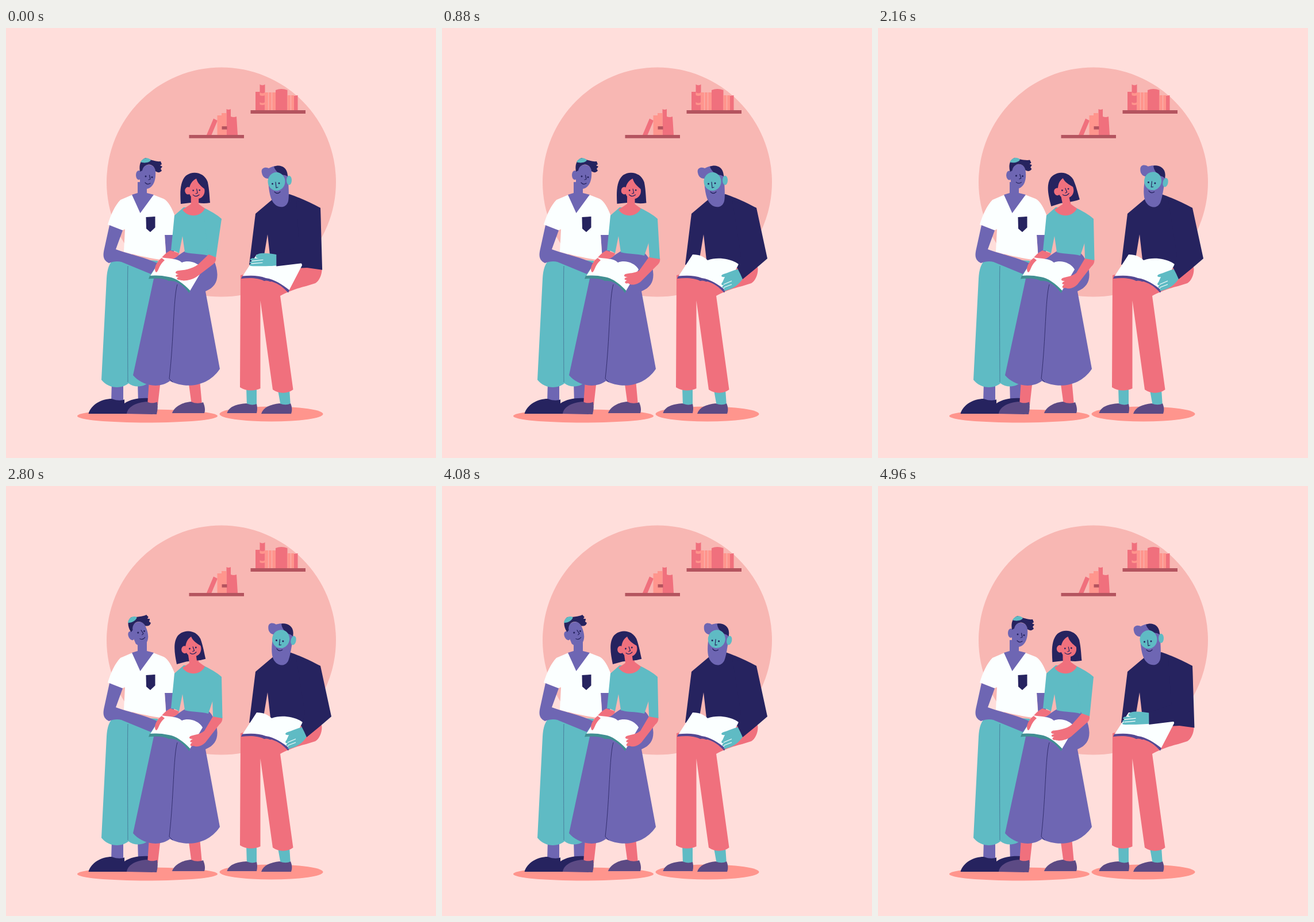
An HTML page that plays this animation: 748 by 748 pixels, repeating every 5 s.

```html
<!DOCTYPE html>
<html lang="en">
<head>
<meta charset="utf-8">
<title>Reading together</title>
<style>
html, body { margin: 0; width: 100%; height: 100%; overflow: hidden; background: #ffdedb; }
svg { display: block; width: 100vw; height: 100vh; }
.purple { fill: #6e66b3; }
.navy { fill: #26235f; }
.teal { fill: #5fbbc4; }
.pink { fill: #f0707d; }
.coral { fill: #ff958d; }
.white { fill: #fbffff; }
.shoe { fill: #5c4a84; }
.wood { fill: #b4545f; }
.line { fill: none; stroke: #26235f; stroke-width: 1.2; stroke-linecap: round; stroke-linejoin: round; }
.seam { fill: none; stroke: #26235f; stroke-width: .8; }
</style>
</head>
<body>
<svg viewBox="0 0 748 748">
  <rect width="748" height="748" fill="#ffdedb"/>
  <circle cx="374.5" cy="268" r="199.5" fill="#f8b7b3"/>
  <ellipse class="coral" cx="246" cy="675" rx="122" ry="11.5"/>
  <ellipse class="coral" cx="461.5" cy="671.5" rx="90" ry="13"/>

  <g id="shelves">
    <path class="pink" d="M349 186L361 157.5L368 161L357.500 186ZM383.500 141Q387 143 391 141V154Q396 156 401 154L403 186H383.500Z"/>
    <path class="coral" d="M367.500 152H375V148H383.500V186H367.500Z"/>
    <rect class="wood" x="375.500" y="171" width="9" height="5.500"/>
    <rect class="wood" x="318.500" y="186" width="95.500" height="5.700"/>
    <path class="pink" d="M434 111H441.500V98Q446 101 450.500 98V143H434ZM469 108Q479 104 489.500 108V143Q479 147 469 143ZM501 118L507.500 117V143H501Z"/>
    <path class="coral" d="M450.500 112H469V143H450.500ZM489.500 117H501V143H489.500ZM441.500 112Q446 115 450.500 112V117Q446 119 441.500 117ZM441.500 129Q446 132 450.500 129V133Q446 135 441.500 133Z"/>
    <path d="M456.500 112V143M462.500 112V143M495.500 117V143" stroke="#f8b7b3" stroke-width="1"/>
    <rect class="wood" x="425.500" y="143" width="95.500" height="6"/>
  </g>

  <g id="guy">
    <path class="purple" d="M184 615H204V652H183ZM229 615H249V652H230Z"/>
    <path class="navy" d="M143.500 671C148 655 166 645 184 645C194 649 203 648 206 646V653C216 646 232 643 248 644V671Z"/>
    <path class="teal" d="M190 400C179 408 176 420 175 436L166 612C178 627 200 629 213 618C225 627 243 625 252 612L264 405Z"/>
    <path class="seam" d="M212 414Q211 440 212 616" opacity=".5"/>
    <path class="purple" d="M276 358H292V402H279Z"/>
    <path class="white" d="M220 290H256L274 297C282 301 288 312 293 325L292 360H276L279 404C255 402 225 395 205 389L207 350L202 352L177 342C182 325 190 308 199 299Z"/>
    <path class="purple" d="M180 343L171 384C168 397 169 404 179 409C186 406 194 405 201 407L252 428L265 410C240 398 212 393 191 385L203 352Z"/>
    <path class="purple" d="M219 290L229 287V268H245V287L257 290L233.500 322Z"/>
    <path class="navy" d="M243.500 329L259.500 328V347L251 355L244 349Z"/>
    <g id="guyHead">
      <ellipse class="purple" cx="231" cy="256" rx="5" ry="8"/>
      <path class="purple" d="M233 249C236 236 258 233 260 248C261 262 258 273 250 278C245 281 238 281 233 272Z"/>
      <path class="navy" d="M233 250C231 238 234 229 243 226C251 229 262 233 269 232L271 237L268 239L272 241L269 245L271 248C268 252 264 252 260 249C258 234 240 234 237 248Z"/>
      <path class="teal" d="M234 233C238 225 248 224 252 230C250 234 240 236 234 233Z"/>
      <g id="guyFace">
        <circle class="navy" cx="243" cy="258" r="1.500"/>
        <circle class="navy" cx="254" cy="259.500" r="1.500"/>
        <path class="line" d="M249.500 256L251 263L248 264M242 269Q246 273.500 251 270"/>
      </g>
    </g>
  </g>

  <g id="girl">
    <path class="pink" d="M249 612L246 656H264L269 612ZM317 612L323 656H341L337 612Z"/>
    <path class="shoe" d="M210 671C212 658 228 651 245 650C250 653 258 653 263 650.500Q265 661 262 672ZM289 670C293 658 308 651 322 650C330 654 338 653 343 651C346 658 347 665 345 670Z"/>
    <path class="purple" d="M313 387C295 398 275 412 257 436L221 604C235 621 265 629 285 614C310 627 350 626 372 593L347 458C362 452 368 442 367.500 428C367 412 359 397 352 391Z"/>
    <path class="seam" d="M298 446C291 470 292 540 284 610L290 616"/>
    <path class="teal" d="M309 312L341 311C355 318 368 325 375 332L360 372L352 396C338 392 325 394 311 390L307 362L301 392C296 388 291 387 287 387L293 326Z"/>
    <path class="pink" d="M307 316L322 306V290H335V306L346 314C338 330 316 330 307 316Z"/>
    <path class="pink" d="M286 387L301 392C300 400 288 402 278 406L265 425C258 422 258 415 264 408C270 400 276 392 286 387Z"/>
    <path class="white" d="M271 399C285 402 298 400 306 408C318 403 335 408 342 420L319 459C308 445 296 436 283 434C270 431 260 431 250 433Z"/>
    <path fill="#418f92" d="M250 431L248 436.500C262 435 275 435 283 440C296 438 308 447 318.500 461L320.500 457C308 444 296 435 283 433C270 430 260 430 250 431Z"/>
    <path class="pink" d="M271 400C262 406 256 419 261 425C266 424 265 413 276 404Z"/>
    <path class="pink" id="girlArm"/>
    <path class="teal" id="girlSleeve"/>
    <g id="girlHead">
      <path class="navy" d="M304 306C303 288 302 268 313 257C325 247 345 251 351 268C354 282 354 295 355 304Q344 306 334 304H321Z"/>
      <g id="girlFace">
        <path class="pink" d="M321.500 288H335V310H321.500Z"/>
        <ellipse class="pink" cx="316.500" cy="283" rx="5.500" ry="6.500"/>
        <path class="pink" d="M318 283C319 272 324 265 331 262C333 270 339 275 345 280C347 290 340 298 331 297C323 297 318 291 318 283Z"/>
        <circle class="navy" cx="325.500" cy="282.500" r="1.400"/>
        <circle class="navy" cx="336.500" cy="282" r="1.400"/>
        <path class="line" d="M331.500 280L333 287L330 288M325 290Q330 295 336 290"/>
      </g>
    </g>
  </g>

  <g id="man">
    <path class="teal" d="M418 625H436V658H419ZM473 630L493 628L495 658H478Z"/>
    <path class="shoe" d="M384.500 670C388 658 402 654 418 653C425 656 431 656 436 654Q438 662 436 670ZM444 671C448 659 460 655 476 653C483 656 490 656 495 653C498 660 498 666 496 671Z"/>
    <path class="pink" d="M408 430L407 625C418 632 432 632 442.500 627L442.500 474L464 629C475 637 490 636 499.500 629L477 466C487 460 505 453 522 449L538 444C546 440 551 425 549 416L500 410Z"/>
    <path class="navy" d="M466 296L434 323L423 412L447 407L455 359L461 412L500 418L548 416L547 313C530 304 511 295 493 289Z"/>
    <path class="white" d="M436 394C448 394 456 398 462 404C480 397 505 402 516 411L491 459C478 447 465 439 452 437C440 432 425 431 410 434Z"/>
    <path fill="#544892" d="M411 431.500L409 436C425 434 440 435 449 440C455 438 458 442 462 441C475 445 483 452 491 460.500L493 456C480 446 467 437 452 435C440 430 425 430 411 431.500Z"/>
    <path class="teal" id="manHand"/>
    <path id="manFingers" fill="none" stroke="#fbffff" stroke-width="1.200"/>
    <path class="navy" id="manSleeve"/>
    <g id="manHead">
      <path class="purple" d="M445 252C443 244 450 241 457 244C463 240 472 239 478 240L491 258C491 275 493 290 491 301C488 313 476 314 468 307C460 300 457 285 456 262C450 262 446 258 445 252Z"/>
      <path class="navy" d="M466 241C475 237 490 240 490 258L485 256C479 256 469 251 466 241Z"/>
      <ellipse class="teal" cx="492.500" cy="265" rx="4.500" ry="8"/>
      <ellipse class="teal" cx="470.500" cy="267" rx="15" ry="16"/>
      <circle class="navy" cx="463.500" cy="271" r="1.500"/>
      <circle class="navy" cx="475" cy="270" r="1.500"/>
      <path class="line" d="M469 268L470 278L473 277M467 285Q472 290 477 285"/>
    </g>
  </g>
</svg>
<script>
const LOOP = 5000;
const $ = id => document.getElementById(id);
const NUM = /-?\d+(?:\.\d+)?/g;

// Blends same-structure paths; the last one takes the remaining weight.
function morph(id, ...paths) {
  const sets = paths.map(p => p.match(NUM).map(Number));
  const last = sets.pop();
  return weights => {
    let i = 0;
    const d = paths[0].replace(NUM, () => {
      const v = sets.reduce((sum, s, k) => sum + weights[k] * (s[i] - last[i]), last[i]);
      i++;
      return v.toFixed(2);
    });
    $(id).setAttribute('d', d);
  };
}

// Keys are [time, ...values], joined by sine easing.
function track(t, keys) {
  const n = keys.findIndex(k => k[0] > t);
  const [t0, ...a] = keys[n - 1], [t1, ...b] = keys[n];
  const e = (1 - Math.cos(Math.PI * (t - t0) / (t1 - t0))) / 2;
  return a.map((v, i) => v + (b[i] - v) * e);
}

const turn = (id, x, y, deg, dx = 0, dy = 0) =>
  $(id).setAttribute('transform', `translate(${dx} ${dy}) rotate(${deg} ${x} ${y})`);
const shift = (id, dx, dy = 0) => $(id).setAttribute('transform', `translate(${dx} ${dy})`);

const girlSleeve = morph('girlSleeve',
  'M345 330L375 332L365 399L351 393L349 370Z',
  'M350 330L375 332L379 402L361 399L359 370Z',
  'M350 330L375 332L376.5 404L360 401L359 370Z');
const girlArm = morph('girlArm',
  'M352 394L334 411C322 420 308 421 298 422C292 424 294 428 300 428C293 429 293 433 300 433C295 434 296 438 302 438C308 441 324 438 332 432L360 411C365 407 366 402 364 397Z',
  'M361 397L343 422C335 427 325 426 319 428C315 431 317 433 323 433C316 435 316 438 322 439C316 441 318 446 324 444C330 449 341 446 347 440L374 413C379 409 380 404 379 400Z',
  'M361 399L345 426C338 432 327 433 321 435C317 438 319 440 325 440C319 443 319 446 324 446C318 450 321 454 326 452C333 455 341 452 347 446L371 415C376 411 377 406 376 402Z');

const manSleeve = morph('manSleeve',
  'M505 300L547 313L550 421L516 416L514 409L470 414.500L470 393L510 380Z',
  'M505 300L547 313L566 401L545 419L523 437L519 428L514 418L520 395Z');
const manHand = morph('manHand',
  'M471 394C460 392 445 390 438 393C432 396 433 400 440 401L428 400C423 402 423 404 429 405C422 406 421 409 428 409C421 411 422 414 429 414C445 414 460 414 471 413Z',
  'M516 419C508 421 500 425 490 428C484 430 485 434 492 433L488 442C484 446 487 449 492 446C485 450 487 454 492 451C488 456 491 459 496 456C508 453 520 444 525 432Z');
const manFingers = morph('manFingers',
  'M427 405L447 403M427 409.5L446 408',
  'M490 446L504 440M491 451L504 446');

function draw(t) {
  const reach = track(t, [[-220, 0, 0], [150, 1.5, 0], [900, 0, 1], [1200, 0, 0], [4780, 0, 0], [5150, 1.5, 0]]);
  girlSleeve(reach);
  girlArm(reach);

  const cross = track(t, [[-700, 0], [40, 1], [90, 1], [780, 0], [4300, 0], [5040, 1]]);
  manSleeve(cross);
  manHand(cross);
  manFingers(cross);

  const [guy] = track(t, [[0, 0], [1950, 0], [2650, 1], [4400, 1], [4960, 0], [5001, 0]]);
  turn('guyHead', 236, 292, -22 * guy);
  shift('guyFace', guy, -2.5 * guy);

  const [deg, dx, dy, look] = track(t, [[-500, -8, -5.5, 1, 4.5], [100, .4, .4, 0, 0], [950, .4, .4, 0, 0],
    [1550, -12, 0, 0, 2.5], [2000, -12, 0, 0, 2.5], [2700, -8, -5.5, 1, 4.5], [4500, -8, -5.5, 1, 4.5], [5100, .4, .4, 0, 0]]);
  turn('girlHead', 324, 318, deg, dx, dy);
  shift('girlFace', look);

  const [man] = track(t, [[0, 0], [950, 0], [1550, 1], [4000, 1], [4600, 0], [5001, 0]]);
  turn('manHead', 478, 298, 12 * man, man);
}

function frame() {
  draw(performance.now() % LOOP);
  requestAnimationFrame(frame);
}
frame();
</script>
</body>
</html>
```
